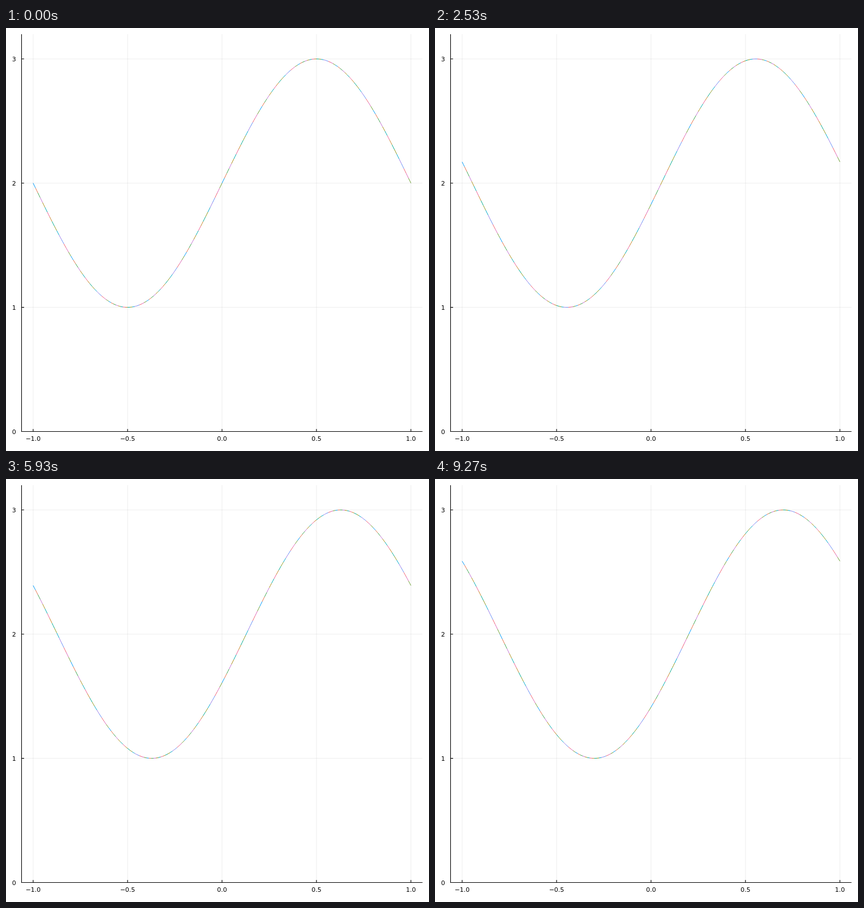
An HTML page that plays this animation: 748 px wide and 749 px high, repeating every 9310 ms.

```html
<!DOCTYPE html>
<html lang="en">
<head>
<meta charset="utf-8">
<title>Travelling sine wave</title>
<style>
  html, body { margin: 0; width: 100%; height: 100%; overflow: hidden; background: #fff; }
  svg { display: block; width: 748px; height: 749px; }
  text { font: 11px "DejaVu Sans", sans-serif; fill: #000; }
  path { fill: none; stroke-width: 1; }
  .grid { stroke: #000; stroke-opacity: .07; }
  .axis { stroke: #000; stroke-width: 1.1; }
</style>
</head>
<body>
<svg viewBox="0 0 748 749">
  <defs><clipPath id="area"><rect x="27.5" y="11" width="709" height="703.5"/></clipPath></defs>
  <path class="grid" id="grid"/>
  <path class="axis" id="axis"/>
  <g id="labels"></g>
  <g id="wave" clip-path="url(#area)"></g>
</svg>
<script>
const LOOP = 9310, LAST = 278, TRAVEL = 0.2;
const CELLS = 160, STEPS = 2;
const COLORS = ["#009afa", "#e36f47", "#3ea44e", "#c371d2", "#ac8e18", "#00aaae", "#ed5e93", "#c68225",
  "#00a98d", "#8e971e", "#00a9cc", "#9b7fe9", "#618df6", "#f06073", "#dd65b6", "#6c9f33"];
const LEFT = 27.5, RIGHT = 736.5, TOP = 11, BOTTOM = 714.5;

const px = x => 382 + 334 * x;
const py = y => BOTTOM - 219.9 * y;
const byId = id => document.getElementById(id);

function add(parent, tag, attrs) {
  const el = document.createElementNS("http://www.w3.org/2000/svg", tag);
  for (const key in attrs) el.setAttribute(key, attrs[key]);
  return parent.appendChild(el);
}

function label(text, x, y, anchor) {
  add(byId("labels"), "text", { x, y, "text-anchor": anchor }).textContent = text;
}

function drawFrame() {
  let grid = "", axis = `M${LEFT} ${TOP}V${BOTTOM}H${RIGHT}`;
  for (const x of [-1, -0.5, 0, 0.5, 1]) {
    grid += `M${px(x)} ${TOP}V${BOTTOM}`;
    axis += `M${px(x)} ${BOTTOM}v-4.5`;
    label(x.toFixed(1).replace("-", "\u2212"), px(x), 731, "middle");
  }
  for (const y of [0, 1, 2, 3]) {
    if (y) {
      grid += `M${LEFT} ${py(y)}H${RIGHT}`;
      axis += `M${LEFT} ${py(y)}h4.5`;
    }
    label(y, 17.7, py(y) + 4.2, "end");
  }
  byId("grid").setAttribute("d", grid);
  byId("axis").setAttribute("d", axis);
}

const strokes = COLORS.map(stroke => add(byId("wave"), "path", { stroke }));

// Each cell of the wave takes the next palette colour.
function drawWave(frame) {
  const shift = TRAVEL * frame / LAST;
  // The second step holds an empty solution, which lies on the axis.
  const value = x => frame === 1 ? 0 : 2 + Math.sin(Math.PI * (x - shift));
  const paths = COLORS.map(() => "");
  for (let cell = 0; cell < CELLS; cell++) {
    for (let i = 0; i <= STEPS; i++) {
      const x = -1 + 2 * (cell + i / STEPS) / CELLS;
      paths[cell % COLORS.length] += `${i ? "L" : "M"}${px(x).toFixed(2)} ${py(value(x)).toFixed(2)}`;
    }
  }
  strokes.forEach((el, i) => el.setAttribute("d", paths[i]));
}

// 30 steps a second, each starting on a multiple of 10 ms.
function frameAt(time) {
  const t = Math.floor(time % LOOP / 10) * 10;
  return Math.min(LAST, Math.floor((t + 5) * 0.03));
}

let shown = -1;
function tick() {
  const frame = frameAt(performance.now());
  if (frame !== shown) drawWave(shown = frame);
  requestAnimationFrame(tick);
}

drawFrame();
tick();
</script>
</body>
</html>
```
